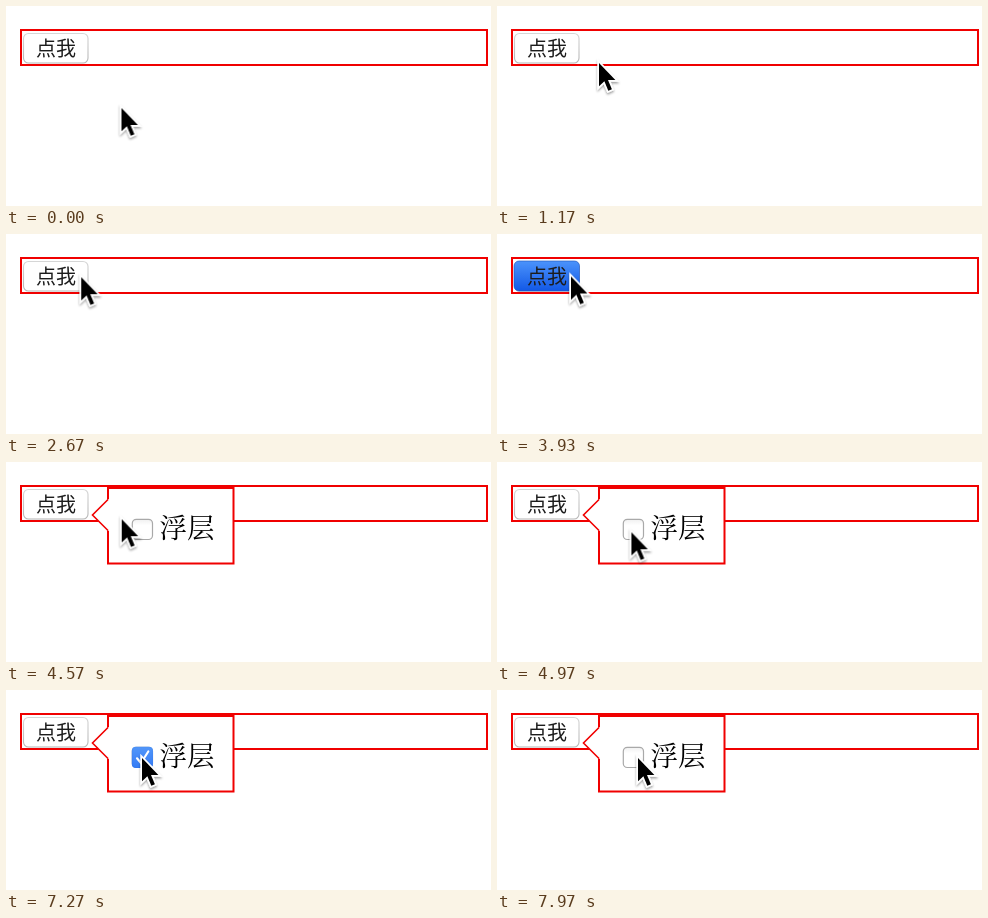
These frames come from a looping animation (485 px wide and 200 px high, 8 s). An HTML page:

```html
<!DOCTYPE html>
<html lang="zh-CN">
<head>
<meta charset="utf-8">
<title>点我</title>
<style>
  html, body { margin: 0; width: 100%; height: 100%; overflow: hidden; background: #fff; }
  svg { display: block; width: 485px; height: 200px; }
  .line { fill: none; stroke: #f00000; stroke-width: 2; }
  .label { font: 20px "Noto Sans CJK SC", "Noto Sans CJK", sans-serif; fill: #1c1c1c; }
  .title { font: 27.5px "Noto Serif CJK SC", "Songti SC", "Noto Sans CJK SC", serif; fill: #000; }

  .press, .popup, .down, .checked, .cursor { animation: 8s linear infinite; }
  .press { animation-name: press; }
  .popup { animation-name: popup; }
  .down { animation-name: down; }
  .checked { animation-name: checked; }
  .cursor { animation-name: move; animation-timing-function: ease-in-out; }

  @keyframes press {
    0%, 49.1% { opacity: 0; }
    49.11%, 49.98% { opacity: 1; }
    51.25%, 100% { opacity: 0; }
  }
  @keyframes popup {
    0%, 49.98% { opacity: 0; }
    49.99%, 100% { opacity: 1; }
  }
  @keyframes down {
    0%, 70.85% { opacity: 0; }
    70.86%, 73.3% { opacity: .16; }
    75%, 100% { opacity: 0; }
  }
  @keyframes checked {
    0%, 73.2% { opacity: 0; }
    74.9%, 90.8% { opacity: 1; }
    92.8%, 100% { opacity: 0; }
  }
  @keyframes move {
    0%, .35% { transform: translate(115.5px, 102px); }
    1.625%, 10.875% { transform: translate(115.5px, 101.5px); }
    14.6%, 21% { transform: translate(102px, 57px); }
    21.6%, 24.6% { transform: translate(100.5px, 57px); }
    27.5% { transform: translate(97px, 57px); }
    28.75%, 30.5% { transform: translate(89px, 51px); }
    34.1%, 54.6% { transform: translate(74px, 42.5px); animation-timing-function: ease-in; }
    57.1% { transform: translate(115.5px, 57px); animation-timing-function: ease-out; }
    63.3%, 67.5% { transform: translate(135.5px, 71px); }
    67.87%, 70.5% { transform: translate(136.5px, 71px); }
    71.25%, 98.4% { transform: translate(136px, 68px); }
    99.6%, 100% { transform: translate(141px, 68px); }
  }
</style>
</head>
<body>
<svg viewBox="0 0 485 200">
  <defs>
    <linearGradient id="blue" x2="0" y2="1">
      <stop offset="0" stop-color="#4b93fb"/>
      <stop offset="1" stop-color="#1258e6"/>
    </linearGradient>
    <linearGradient id="tick" x2="0" y2="1">
      <stop offset="0" stop-color="#4a92fa"/>
      <stop offset="1" stop-color="#2a75f5"/>
    </linearGradient>
    <linearGradient id="rim" x2="0" y2="1">
      <stop offset="0" stop-color="#d6d6d6"/>
      <stop offset="1" stop-color="#b4b4b4"/>
    </linearGradient>
    <linearGradient id="well" x2="0" y2="1">
      <stop offset="0" stop-color="#f0f0f0"/>
      <stop offset=".3" stop-color="#fff"/>
    </linearGradient>
    <filter id="shade" x="-50%" y="-30%" width="200%" height="170%">
      <feDropShadow dx="0" dy="1.6" stdDeviation="1.3" flood-opacity=".4"/>
    </filter>
  </defs>

  <rect class="line" x="15" y="24" width="466" height="35"/>

  <rect x="17.5" y="27.5" width="64.5" height="29.5" rx="5" fill="#fff" stroke="url(#rim)" stroke-width="1.1"/>
  <rect class="press" x="17" y="27" width="65.5" height="30" rx="5" fill="url(#blue)" stroke="#1a50b8" stroke-width=".6"/>
  <text class="label" x="30" y="50.3">点我</text>

  <g class="popup">
    <rect class="line" x="102" y="26" width="125.5" height="75.5" style="fill:#fff"/>
    <path d="M103.5 37 L101.5 37.5 L86.5 53 L101.5 68.5 L103.5 69Z" fill="#fff"/>
    <path class="line" d="M102 37.5 L86.5 53 L102 68.5" style="stroke-width:1.6"/>
    <rect x="126.3" y="57.3" width="20.2" height="20.2" rx="4" fill="url(#well)" stroke="#a9a9a9" stroke-width="1.2"/>
    <rect class="down" x="126" y="57" width="21" height="21" rx="4"/>
    <g class="checked">
      <rect x="125.8" y="56.8" width="21.2" height="21.2" rx="4" fill="url(#tick)"/>
      <path d="M131 68.3 L135 73 L142.3 61.5" fill="none" stroke="#fff" stroke-width="2.2" stroke-linecap="round" stroke-linejoin="round"/>
    </g>
    <text class="title" x="153.5" y="76.3">浮层</text>
  </g>

  <g class="cursor">
    <path d="M0 0V23.3L5.4 18.3L9.3 27.7L12.9 26.2L9 17H16.4Z" filter="url(#shade)"
      stroke="#fff" stroke-width="3.4" paint-order="stroke"/>
  </g>
</svg>
</body>
</html>
```
